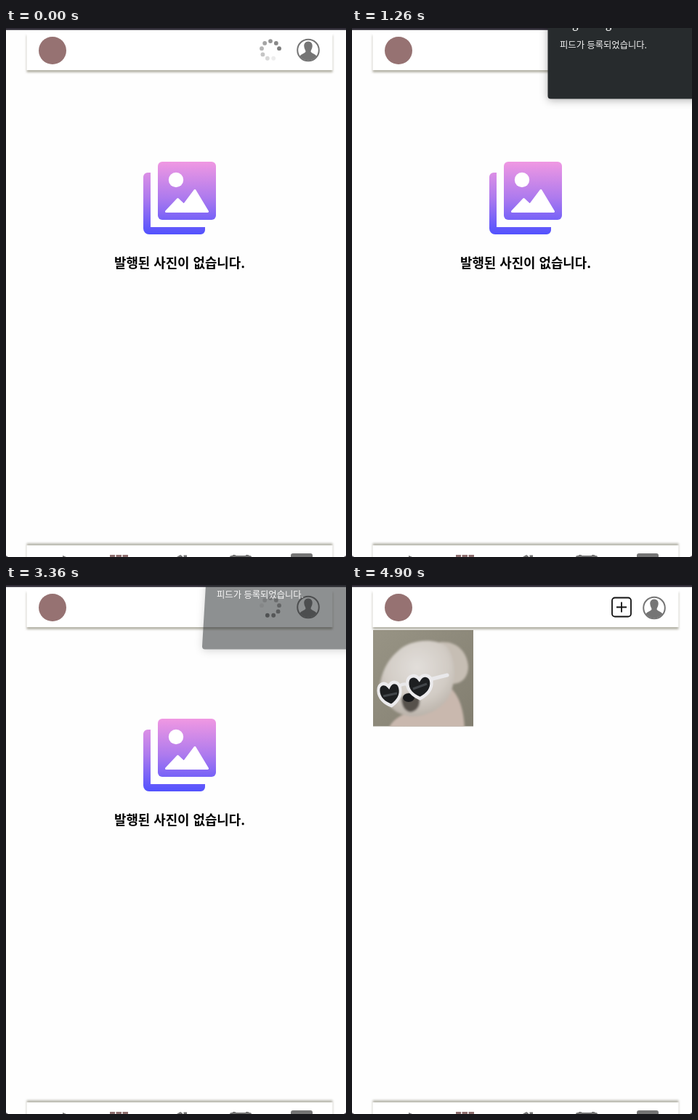
An HTML page that plays this animation: 468 px wide and 728 px high, repeating every 5.04 s.

```html
<!DOCTYPE html>
<html lang="ko">
<head>
<meta charset="utf-8">
<style>
  html, body { margin: 0; width: 100%; height: 100%; overflow: hidden; background: #fefefe; }
  svg { display: block; width: 468px; height: 728px; }
  text { font-family: "Noto Sans CJK KR", "Noto Sans CJK", "Noto Sans", sans-serif; }
  .bar { fill: #fff; filter: drop-shadow(0 3px 1.5px rgba(140, 136, 118, .65)); }
  .nav { fill: #fff; filter: drop-shadow(0 -3px 1.5px rgba(140, 138, 122, .6)); }
  .card { fill: #272b2d; filter: drop-shadow(0 2px 6px rgba(0, 0, 0, .3)); }
</style>
</head>
<body>
<svg viewBox="0 0 468 728">
  <defs>
    <linearGradient id="tint" gradientUnits="userSpaceOnUse" x1="0" y1="184" x2="0" y2="284">
      <stop offset="0" stop-color="#f098e2"/>
      <stop offset=".5" stop-color="#ad7aee"/>
      <stop offset="1" stop-color="#5252fe"/>
    </linearGradient>
    <linearGradient id="wall" x1="0" y1="0" x2="1" y2="1">
      <stop offset="0" stop-color="#989485"/>
      <stop offset="1" stop-color="#827e70"/>
    </linearGradient>
    <radialGradient id="fur" cx=".5" cy=".35" r=".7">
      <stop offset="0" stop-color="#e2deda"/>
      <stop offset=".6" stop-color="#d2ccc5"/>
      <stop offset="1" stop-color="#b5ada4"/>
    </radialGradient>
    <clipPath id="frame"><rect x="29" y="62" width="138" height="132.5"/></clipPath>
    <filter id="soft"><feGaussianBlur stdDeviation="1.5"/></filter>
    <path id="heart" d="M0 15C-9 11-16 4-15-5C-14-13-5-15 0-8C5-15 14-13 15-5C16 4 9 11 0 15Z"/>
  </defs>

  <rect width="468" height="728" fill="#fefefe"/>

  <g id="photo" clip-path="url(#frame)">
    <rect x="29" y="62" width="138" height="133" fill="url(#wall)"/>
    <g filter="url(#soft)">
      <path d="M50 198C56 184 70 176 92 172L134 140C148 152 154 172 155 198Z" fill="#c9b8ae"/>
      <path d="M120 79C142 76 158 90 160 112C160 126 152 136 138 136Z" fill="#c6beb4"/>
      <path d="M38 140C40 122 48 104 62 92C78 75 112 72 130 84C144 102 144 136 132 156C120 174 94 184 76 180C56 176 42 160 38 140Z" fill="url(#fur)"/>
      <path d="M68 156C73 148 86 146 92 154C96 164 90 174 80 175C73 174 68 166 68 156Z" fill="#57514c"/>
    </g>
    <ellipse cx="78" cy="155" rx="8" ry="6" fill="#191a1c"/>
    <path d="M107 130L131 124" stroke="#e9e8ea" stroke-width="5" stroke-linecap="round"/>
    <path d="M64 140Q71 134 78 138" fill="none" stroke="#e9e8ea" stroke-width="4"/>
    <g fill="#1d1f21" stroke="#ecebed" stroke-width="4">
      <use href="#heart" transform="translate(52 149) rotate(-8) scale(1 1.15)"/>
      <use href="#heart" transform="translate(93 139) rotate(-2) scale(1.1 1.15)"/>
    </g>
    <path d="M43 153L62 149M84 143L103 136" stroke="#42464a" stroke-width="3"/>
  </g>

  <g id="empty">
    <g fill="url(#tint)">
      <path d="M199 199H195A6 6 0 0 0 189 205V276A8 8 0 0 0 197 284H268A6 6 0 0 0 274 278V274H199Z"/>
      <rect x="209" y="184" width="80" height="80" rx="6"/>
    </g>
    <circle cx="234" cy="209" r="10.2" fill="#fff"/>
    <path d="M220.500 252.500L236.500 235.500L245 243.500L260 223.500L277.500 252.500Z" fill="#fff" stroke="#fff" stroke-width="3" stroke-linejoin="round"/>
    <text x="239" y="330" font-size="17.850" font-weight="700" text-anchor="middle">발행된 사진이 없습니다.</text>
  </g>

  <rect class="bar" x="28.500" y="7" width="421" height="51"/>
  <circle cx="64" cy="31" r="19" fill="#967272"/>
  <g id="spinner"></g>
  <g id="plus" fill="none" stroke="#111" stroke-width="1.800">
    <rect x="358" y="17.500" width="26" height="26" rx="4"/>
    <path d="M364 30.500H378M371 23.500V37.500"/>
  </g>
  <g id="avatar">
    <circle cx="416" cy="30.500" r="14.800" fill="#fff" stroke="#757575" stroke-width="2"/>
    <path d="M416 18.500C420 18.500 422 21.500 421.700 25C421.500 28.500 420 30 419.500 32C419.500 35 426 35.500 427.500 39C424 43 420 44.500 416 44.500S408 43 404.500 39C406 35.500 412.500 35 412.500 32C412 30 410.500 28.500 410.300 25C410 21.500 412 18.500 416 18.500Z" fill="#757575"/>
  </g>

  <rect class="nav" x="28.500" y="712" width="421" height="24"/>
  <g fill="#757575">
    <path d="M78 726L83 728H78Z"/>
    <path d="M235 728L240 725L243 727V728ZM244.500 725.500H249V728H244.500Z"/>
    <path d="M308 728Q308 726 311 726H335Q338 726 338 728ZM312 725H316V727H312ZM330 725H334V727H330Z"/>
    <rect x="392" y="723" width="30" height="9" rx="3"/>
  </g>
  <path d="M143 725H150V728H143ZM151.500 725H159V728H151.500ZM160.500 725H168V728H160.500Z" fill="#8f6f6f"/>
  <path d="M0 726L3 728H0ZM468 726L465 728H468Z" fill="#55515a"/>
  <rect width="468" height="2.800" fill="#302c37"/>

  <g id="toast">
    <path id="card" class="card"/>
    <text id="title" x="286" y="0" font-size="15" fill="#fff">Lugdoring</text>
    <text id="note" font-size="12.300" font-weight="500" fill="#f4f4f4">피드가 등록되었습니다.</text>
  </g>
</svg>

<script>
  const LOOP = 5040, TICK = 70, DOTS = 9;
  const TOAST_IN = 1260, TOAST_OUT = 3360, READY = 3500, PHOTO = 3850;
  const PAUSES = [1, 4, 10, 15];   // ticks on which the spinner stalls
  const SHADES = [126, 136, 147, 164, 181, 197, 216, 237, 254];

  const el = id => document.getElementById(id);
  const show = (id, on) => el(id).setAttribute("display", on ? "inline" : "none");
  const set = (id, attrs) => {
    for (const key in attrs) el(id).setAttribute(key, attrs[key]);
  };

  const dots = Array.from({ length: DOTS }, (_, i) => {
    const dot = document.createElementNS("http://www.w3.org/2000/svg", "circle");
    const angle = i * 2 * Math.PI / DOTS;
    dot.setAttribute("cx", 364 + 12.2 * Math.sin(angle));
    dot.setAttribute("cy", 30.3 - 12.2 * Math.cos(angle));
    dot.setAttribute("r", 2.9);
    return el("spinner").appendChild(dot);
  });

  function spin(tick) {
    const head = 2 + tick - (PAUSES.includes(tick) ? 1 : 0);
    dots.forEach((dot, i) => {
      const v = SHADES[(head - i + DOTS) % DOTS];
      dot.setAttribute("fill", `rgb(${v},${v},${v})`);
    });
  }

  // The card tips backwards and fades; n counts the steps since it began to leave.
  function placeToast(n) {
    const bottom = 97.5 - 9 * n, left = 269.5 + .5 * n, top = left + 5 * n;
    set("card", {
      d: `M${top} -20H490V${bottom}H${left + 4}Q${left} ${bottom} ${left} ${bottom - 4}L${top} 0Z`
    });
    set("note", { x: 286 + 4 * n, y: 27.5 - 10 * n });
    set("toast", { opacity: 1 - .48 * n });
    show("title", n === 0);
  }

  function draw(t) {
    const tick = Math.floor((t + .5) / TICK);
    const time = tick * TICK;
    const ready = time >= READY;
    spin(tick);
    show("spinner", !ready);
    show("empty", !ready);
    show("plus", ready);
    show("photo", time >= PHOTO);
    set("avatar", { transform: `translate(0 ${ready ? 1 : 0})` });
    show("toast", time >= TOAST_IN && !ready);
    placeToast(Math.min(2, Math.max(0, (time - TOAST_OUT) / TICK + 1)));
  }

  const start = performance.now();
  function loop() {
    draw((performance.now() - start) % LOOP);
    requestAnimationFrame(loop);
  }
  draw(0);
  requestAnimationFrame(loop);
</script>
</body>
</html>
```
